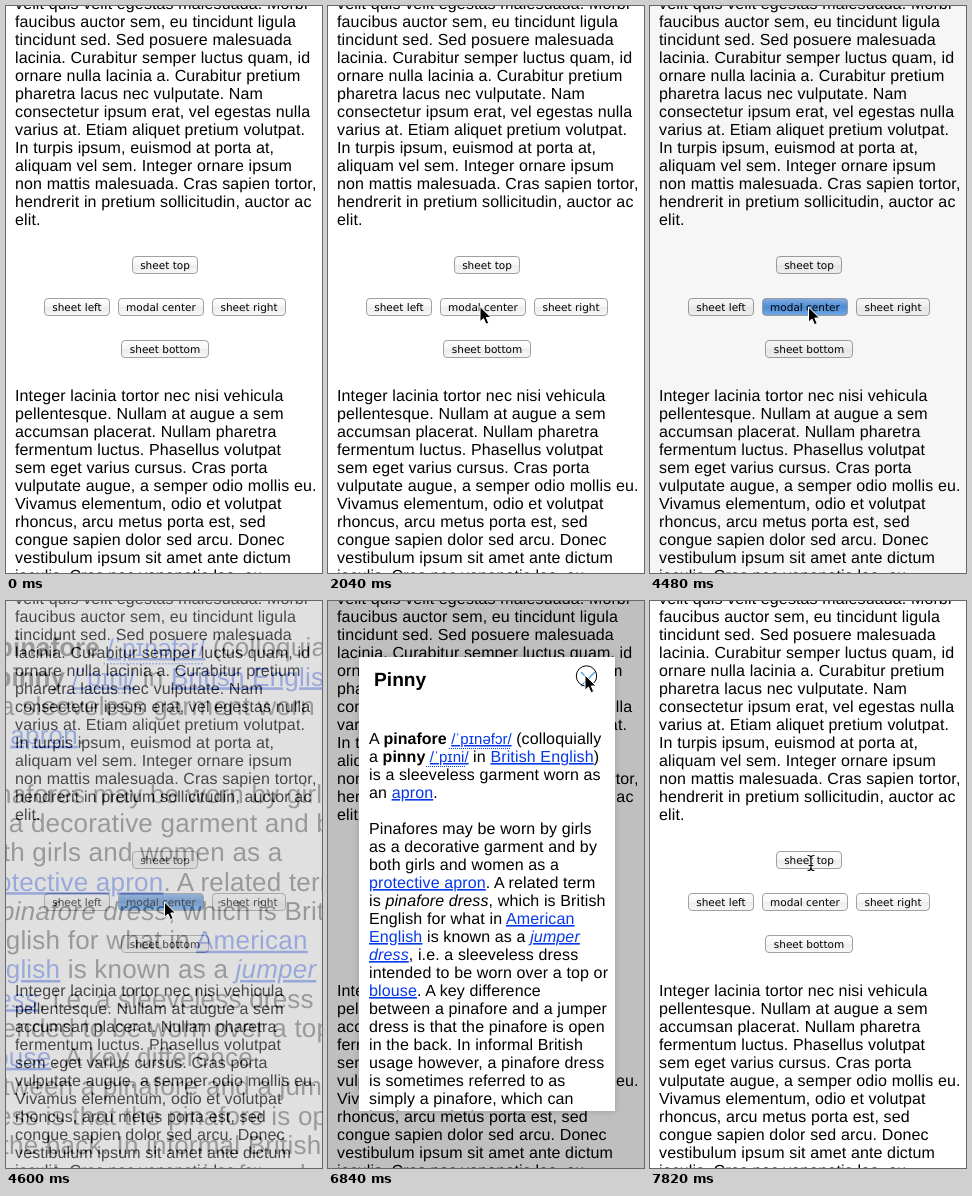
An HTML page that plays this animation: 316 by 567 pixels, repeating every 8 s.

```html
<!DOCTYPE html>
<html lang="en">
<head>
<meta charset="utf-8">
<title>Modal demo</title>
<style>
  html, body { margin: 0; width: 100%; height: 100%; overflow: hidden; background: #fff; }
  svg { display: block; }
  text {
    font: 16px "Liberation Sans", Arial, sans-serif;
    letter-spacing: .13px;
    text-rendering: geometricPrecision;
  }
  .label { font: 10.5px "DejaVu Sans", sans-serif; letter-spacing: 0; text-anchor: middle; }
  .title { font-size: 19.2px; font-weight: bold; letter-spacing: 0; }
  .bold { font-weight: bold; letter-spacing: 0; }
  .italic { font-style: italic; }
  .link, .sound { fill: #0638e6; text-decoration: underline; text-decoration-skip-ink: none; }
  .sound { font-size: 15px; letter-spacing: 0; }
  .sheet { filter: drop-shadow(0 0 3px rgba(0, 0, 0, .18)); }
</style>
</head>
<body>
<svg id="stage" width="316" height="567" viewBox="0 0 316 567">
  <defs>
    <linearGradient id="plain" x2="0" y2="1">
      <stop stop-color="#fff"/><stop offset=".5" stop-color="#f6f6f6"/>
      <stop offset=".5" stop-color="#ececec"/><stop offset="1" stop-color="#f8f8f8"/>
    </linearGradient>
    <linearGradient id="pressed" x2="0" y2="1">
      <stop stop-color="#86b4ea"/><stop offset=".5" stop-color="#4f8fdc"/>
      <stop offset="1" stop-color="#74b0ee"/>
    </linearGradient>
  </defs>
  <g id="page"></g>
  <rect id="shade" width="316" height="567"/>
  <g id="modal">
    <rect class="sheet" x="31" y="56" width="256" height="454" fill="#fff"/>
    <svg x="31" y="56" width="256" height="454" viewBox="31 56 256 454">
      <text class="title" x="46" y="85">Pinny</text>
      <path d="M253 71l14 14m0-14l-14 14" stroke="#55a5ea" stroke-width="1.5"/>
      <g id="article"></g>
      <path d="M121 147.5H183M98 165.5H138" stroke="#0638e6" stroke-dasharray="1 1"/>
    </svg>
  </g>
  <circle id="ring" r="10.2" fill="none" stroke="#000"/>
  <g id="cursor">
    <path id="arrow" d="M0 0V15.2L3.5 12 6 17.7 8.7 16.5 6.3 11H11Z" stroke="#fff" stroke-linejoin="round"/>
    <g id="beam" fill="none" stroke-linecap="round">
      <path d="M-3-7.5Q0-7.5 0-5V5Q0 7.5-3 7.5M3-7.5Q0-7.5 0-5V5Q0 7.5 3 7.5M-2 2.5H2" stroke="#fff" stroke-width="2.6" opacity=".7"/>
      <path d="M-3-7.5Q0-7.5 0-5V5Q0 7.5-3 7.5M3-7.5Q0-7.5 0-5V5Q0 7.5 3 7.5M-2 2.5H2" stroke="#000" stroke-width="1.2"/>
    </g>
  </g>
</svg>
<script>
const LOOP = 8000, LINE = 18;
const $ = id => document.getElementById(id);

const upper = `velit quis velit egestas malesuada. Morbi
faucibus auctor sem, eu tincidunt ligula
tincidunt sed. Sed posuere malesuada
lacinia. Curabitur semper luctus quam, id
ornare nulla lacinia a. Curabitur pretium
pharetra lacus nec vulputate. Nam
consectetur ipsum erat, vel egestas nulla
varius at. Etiam aliquet pretium volutpat.
In turpis ipsum, euismod at porta at,
aliquam vel sem. Integer ornare ipsum
non mattis malesuada. Cras sapien tortor,
hendrerit in pretium sollicitudin, auctor ac
elit.`;
const lower = `Integer lacinia tortor nec nisi vehicula
pellentesque. Nullam at augue a sem
accumsan placerat. Nullam pharetra
fermentum luctus. Phasellus volutpat
sem eget varius cursus. Cras porta
vulputate augue, a semper odio mollis eu.
Vivamus elementum, odio et volutpat
rhoncus, arcu metus porta est, sed
congue sapien dolor sed arcu. Donec
vestibulum ipsum sit amet ante dictum
iaculis. Cras nec venenatis leo, eu`;

// Inline marks: *bold*, _italic_, [link], {pronunciation}
const article = `A *pinafore* {/ˈpɪnəfɔr/} (colloquially
a *pinny* {/ˈpɪni/} in [British English])
is a sleeveless garment worn as
an [apron].

Pinafores may be worn by girls
as a decorative garment and by
both girls and women as a
[protective apron]. A related term
is _pinafore dress_, which is British
English for what in [American]
[English] is known as a _[jumper]_
_[dress]_, i.e. a sleeveless dress
intended to be worn over a top or
[blouse]. A key difference
between a pinafore and a jumper
dress is that the pinafore is open
in the back. In informal British
usage however, a pinafore dress
is sometimes referred to as
simply a pinafore, which can
lead to confusion.`;

const span = name => `<tspan class="${name}">$1</tspan>`;
const markup = s => s
  .replace(/\[(.*?)\]/g, span('link'))
  .replace(/\{(.*?)\}/g, span('sound'))
  .replace(/\*(.*?)\*/g, span('bold'))
  .replace(/_(.*?)_/g, span('italic'));

const block = (text, x, y) => text.split('\n')
  .map((s, i) => `<text x="${x}" y="${y + i * LINE}">${markup(s)}</text>`).join('');

const button = (label, x, y, width) => `
  <rect x="${x + .5}" y="${y + .5}" width="${width - 1}" height="17" rx="3.5" fill="url(#plain)" stroke="#a0a0a0"/>
  <text class="label" x="${x + width / 2}" y="${y + 13}">${label}</text>`;

$('page').innerHTML = block(upper, 9, 3) + block(lower, 9, 395) +
  button('sheet top', 126, 250, 66) +
  button('sheet left', 38, 292, 66) +
  `<g id="center">${button('modal center', 112, 292, 86)}</g>` +
  button('sheet right', 206, 292, 74) +
  button('sheet bottom', 115, 334, 88);
$('article').innerHTML = block(article, 41, 143);
const centerFace = $('center').querySelector('rect');

// Cursor path: time, x, y
const path = [
  [180, 276, 363], [300, 205, 305], [470, 205, 305], [800, 165, 394],
  [1220, 128, 298], [1280, 121, 289], [1460, 121, 289], [1690, 150, 301],
  [2039, 150, 301], [2040, 152, 300.5], [4130, 152, 300.5], [4300, 158.5, 301],
  [5000, 158.5, 301], [5530, 257, 74], [7150, 257, 74], [7590, 189, 236],
  [7650, 189, 236], [7820, 161, 262], [LOOP, 161, 262]
];

const ramp = (t, from, to) => Math.min(1, Math.max(0, (t - from) / (to - from)));
const ease = p => .5 - Math.cos(p * Math.PI) / 2;
const show = (el, on) => el.setAttribute('visibility', on ? 'visible' : 'hidden');

function cursorAt(t) {
  const i = Math.max(1, path.findIndex(k => k[0] >= t));
  const [t0, x0, y0] = path[i - 1], [t1, x1, y1] = path[i];
  const p = ease(ramp(t, t0, t1));
  return [x0 + (x1 - x0) * p, y0 + (y1 - y0) * p];
}

function draw(t) {
  const open = ease(ramp(t, 4526, 4705)) * (1 - ease(ramp(t, 7030, 7230)));
  const dim = ramp(t, 4450, 4680) * (1 - ramp(t, 7060, 7320));
  const scale = 2 - open;
  $('shade').setAttribute('opacity', dim * .25);
  $('modal').setAttribute('opacity', open ** 1.3);
  $('modal').setAttribute('transform',
    `translate(158.5 283) scale(${scale}) translate(-158.5 -283)`);
  centerFace.setAttribute('fill', t >= 4400 && t < 4680 ? 'url(#pressed)' : 'url(#plain)');

  const [x, y] = cursorAt(t);
  const beam = t > 7220 || (t < 1300 && y > 376);
  const visible = t >= 180;
  $('cursor').setAttribute('transform', `translate(${x} ${y})`);
  show($('arrow'), visible && !beam);
  show($('beam'), visible && beam);

  $('ring').setAttribute('transform', `translate(${x + 1.5} ${y + 1})`);
  show($('ring'), (t >= 3420 && t < 3530) || (t >= 6840 && t < 6960));
}

const start = performance.now();
function tick() {
  draw((performance.now() - start) % LOOP);
  requestAnimationFrame(tick);
}
tick();
</script>
</body>
</html>
```
